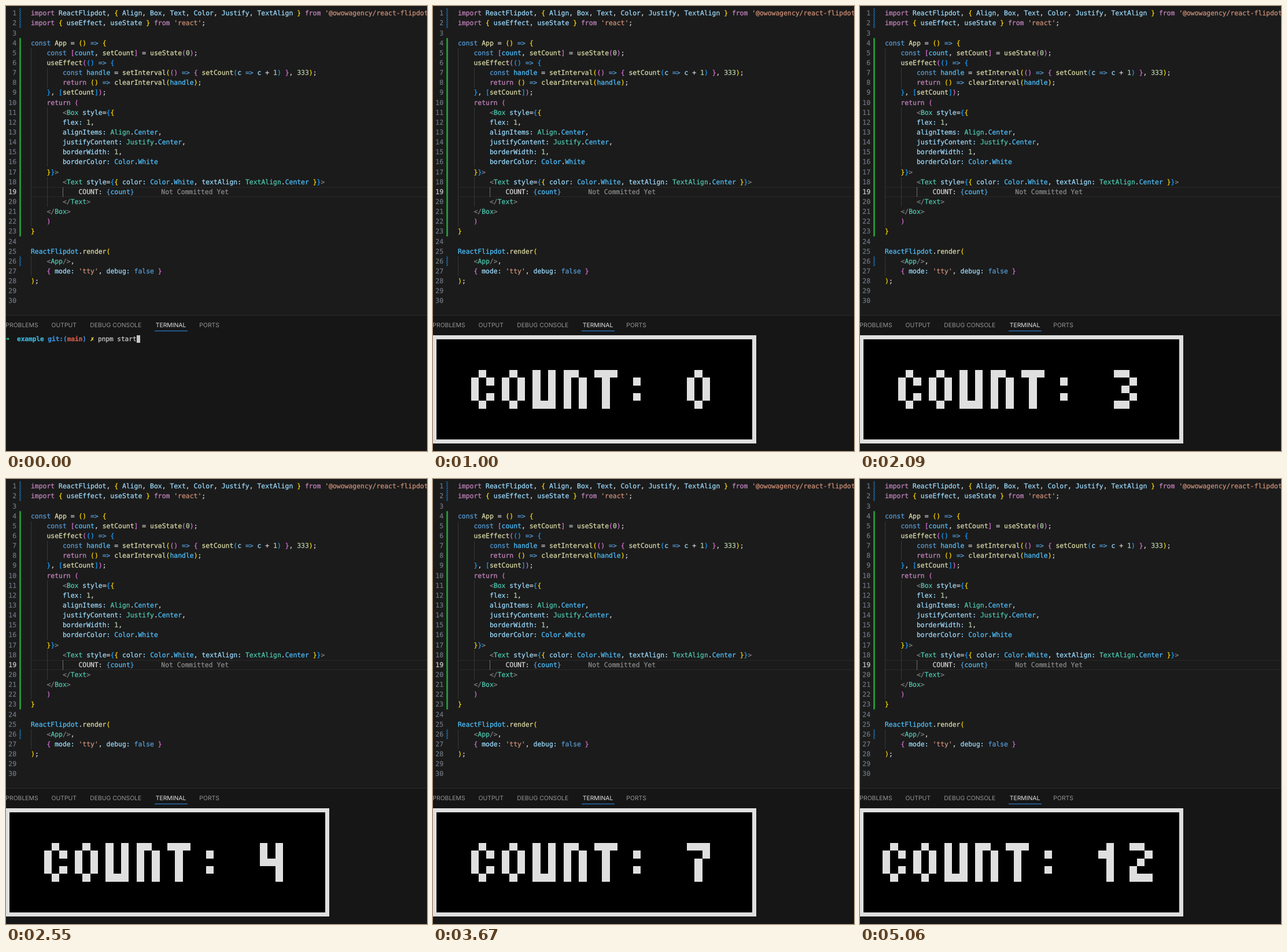
Animation of 728 by 769 pixels, one loop 5.09 s. Source, as an HTML page:

```html
<!DOCTYPE html>
<html lang="en">
<head>
<meta charset="utf-8">
<title>Flipdot counter</title>
<style>
  html, body { margin: 0; width: 100%; height: 100%; overflow: hidden; background: #1b1b1b; }
  svg { display: block; width: 728px; height: 769px; }
  text { white-space: pre; text-rendering: geometricPrecision; stroke-width: 0.25px; }
  .crisp { shape-rendering: crispEdges; }
  .code { font: 11.42px 'DejaVu Sans Mono', monospace; }
  .term { font: 11.074px 'DejaVu Sans Mono', monospace; }
  .tab { font: 10.4px Inter, 'Open Sans', sans-serif; }
  .bold { font-weight: bold; }
</style>
</head>
<body>
<svg viewBox="0 0 728 769" xmlns="http://www.w3.org/2000/svg">
  <defs>
    <pattern id="hatch" width="2.8" height="2.8" patternUnits="userSpaceOnUse" patternTransform="rotate(-45)">
      <rect width="2.8" height="1.4" fill="#1b74b8"/>
    </pattern>
  </defs>
  <rect width="728" height="769" fill="#1b1b1b"/>
  <g id="editor"></g>
  <rect y="534" width="728" height="235" fill="#161616"/>
  <rect y="534" width="728" height="1" fill="#2a2a2a"/>
  <g id="tabs"></g>
  <rect x="257" y="560.8" width="57" height="1.4" fill="#2a70bc"/>
  <g id="shell">
    <g id="prompt"></g>
    <g id="output"></g>
    <rect id="cursor" class="crisp" width="6.667" height="13.333" fill="#c8c8c8"/>
  </g>
  <g id="board" class="crisp">
    <rect x="-1" y="569" width="560" height="186.67" fill="#dfdfdf"/>
    <rect x="5.67" y="575.67" width="546.67" height="173.33" fill="#000"/>
    <path id="dots" fill="#dfdfdf"/>
  </g>
</svg>
<script>
const $ = id => document.getElementById(id);

function add(parent, name, attrs, content = '') {
  const el = document.createElementNS('http://www.w3.org/2000/svg', name);
  for (const key in attrs) el.setAttribute(key, attrs[key]);
  el.textContent = content;
  parent.appendChild(el);
  return el;
}

// A hairline stroke in the text colour gives the slightly heavy screen weight.
const ink = color => ({ fill: color, stroke: color });

// Editor: each "§x" switches the colour of the text that follows.
const COLORS = {
  k: '#c586c0', v: '#9cdcfe', w: '#d4d4d4', f: '#dcdcaa', b: '#569cd6', c: '#4fc1ff',
  t: '#4ec9b0', s: '#ce9178', n: '#b5cea8', g: '#ffd700', o: '#da70d6', u: '#179fff', a: '#808080'
};
const SOURCE = `§kimport §vReactFlipdot§w, §g{ §vAlign§w, §vBox§w, §vText§w, §vColor§w, §vJustify§w, §vTextAlign §g} §kfrom §s'@owowagency/react-flipdot'§w;
§kimport §g{ §vuseEffect§w, §vuseState §g} §kfrom §s'react'§w;

§bconst §fApp §w= §g() §b=> §g{
    §bconst §o[§ccount§w, §fsetCount§o] §w= §fuseState§o(§n0§o)§w;
    §fuseEffect§o(§u() §b=> §u{
        §bconst §chandle §w= §fsetInterval§g(§o() §b=> §o{ §fsetCount§u(§vc §b=> §vc §w+ §n1§u) §o}§w, §n333§g)§w;
        §kreturn §g() §b=> §fclearInterval§g(§chandle§g)§w;
    §u}§w, §u[§fsetCount§u]§o)§w;
    §kreturn §o(
        §a<§tBox §vstyle§w=§u{§g{
        §vflex: §n1§w,
        §valignItems: §tAlign§w.§cCenter§w,
        §vjustifyContent: §tJustify§w.§cCenter§w,
        §vborderWidth: §n1§w,
        §vborderColor: §cColor§w.§cWhite
    §g}§u}§a>
        §a<§tText §vstyle§w=§u{§g{ §vcolor: §cColor§w.§cWhite§w, §vtextAlign: §tTextAlign§w.§cCenter §g}§u}§a>
            §wCOUNT: §b{§ccount§b}
        §a</§tText§a>
    §a</§tBox§a>
    §o)
§g}

§cReactFlipdot§w.§frender§g(
    §a<§tApp§a/>§w,
    §o{ §vmode: §s'tty'§w, §vdebug: §bfalse §o}
§g)§w;

`.split('\n');

const editor = $('editor');
const LEFT = 43, ADVANCE = 6.875, LINE = 17.14, ACTIVE = 19;
const lineTop = n => 4 + (n - 1) * LINE;
const baseline = n => lineTop(n) + 12.3;

function guide(level, from, to, fill = '#373737') {
  add(editor, 'rect', {
    class: 'crisp', x: Math.round(LEFT + level * 4 * ADVANCE), y: lineTop(from),
    width: 1, height: (to - from + 1) * LINE, fill
  });
}
function gutter(from, to, fill) {
  add(editor, 'rect', { x: 23, y: lineTop(from), width: 3, height: (to - from + 1) * LINE, fill });
}

gutter(1, 2, 'url(#hatch)');
gutter(26, 26, 'url(#hatch)');
gutter(4, 23, '#259438');
for (const offset of [0, 16]) {
  add(editor, 'rect', {
    x: LEFT, y: Math.round(lineTop(ACTIVE)) + offset, width: 685, height: 1, fill: '#292929'
  });
}
guide(0, 5, 22);
guide(0, 26, 27);
guide(1, 7, 8);
guide(1, 11, 16);
guide(1, 18, 20);
guide(2, ACTIVE, ACTIVE, '#707070');

SOURCE.forEach((line, i) => {
  const n = i + 1, y = baseline(n);
  add(editor, 'text', {
    class: 'code', x: 18, y, 'text-anchor': 'end', ...ink(n === ACTIVE ? '#cccccc' : '#6e7681')
  }, n);
  const [indent, ...tokens] = line.split('§');
  const row = add(editor, 'text', { class: 'code', x: LEFT + indent.length * ADVANCE, y });
  for (const token of tokens) add(row, 'tspan', ink(COLORS[token[0]]), token.slice(1));
});
add(editor, 'text', { class: 'code', x: 268.3, y: baseline(ACTIVE), ...ink('#8c8c8c') }, 'Not Committed Yet');

// Panel tabs
[['PROBLEMS', -0.7], ['OUTPUT', 78.5], ['DEBUG CONSOLE', 145.2], ['TERMINAL', 258.7], ['PORTS', 334.3]]
  .forEach(([label, x]) => {
    const color = label === 'TERMINAL' ? '#e4e4e4' : '#969696';
    add($('tabs'), 'text', { class: 'tab', x, y: 554.8, fill: color }, label);
  });

// Terminal
const CELL = 20 / 3, ROW = 2 * CELL, TERM_X = -1, TERM_Y = 569;

function print(parent, col, row, content, color = '#d0d0d0', bold = false) {
  add(parent, 'text', {
    class: bold ? 'term bold' : 'term', x: TERM_X + col * CELL, y: TERM_Y + row * ROW + 10.4, ...ink(color)
  }, content);
}

const prompt = $('prompt');
print(prompt, 0, 0, '➜', '#23d18b', true);
print(prompt, 3, 0, 'example', '#3bb4dc', true);
print(prompt, 11, 0, 'git:(', '#3b8eda', true);
print(prompt, 16, 0, 'main', '#cb5a4a', true);
print(prompt, 20, 0, ')', '#3b8eda', true);
print(prompt, 22, 0, '✗', '#f0e442', true);
print(prompt, 24, 0, 'pnpm start');
print($('output'), 0, 2, '> @owowagency/example@1.0.0 start /Users/norvi/Git/react-flipdot/apps/example');
print($('output'), 0, 3, '> node dist/index.js');

// Flipdot glyphs, 3 x 5, drawn at double size
const GLYPHS = {
  C: '.X. X.X X.. X.X .X.', O: '.X. X.X X.X X.X .X.', U: 'X.X X.X X.X X.X XXX',
  N: 'XX. X.X X.X X.X X.X', T: 'XXX .X. .X. .X. .X.', ':': '... .X. ... .X. ...',
  0: '.X. X.X X.X X.X .X.', 1: '.X. XX. .X. .X. .X.', 2: 'XX. ..X .X. X.. XXX',
  3: 'XX. ..X .X. ..X XX.', 4: 'X.X X.X XXX ..X ..X', 5: 'XXX X.. XX. ..X XX.',
  6: '.XX X.. XX. X.X .X.', 7: 'XXX ..X .X. .X. .X.', 8: '.X. X.X .X. X.X .X.',
  9: '.X. X.X .XX ..X XX.'
};
const dotX = col => Math.round(TERM_X + col * CELL);
const dotY = row => Math.round(TERM_Y + row * CELL);

function dotPath(message) {
  const start = (84 - message.length * 8) / 2;
  let d = '';
  [...message].forEach((char, i) => {
    (GLYPHS[char] || '').split(' ').forEach((bits, r) => {
      [...bits].forEach((bit, c) => {
        if (bit !== 'X') return;
        const col = start + i * 8 + c * 2, row = 9 + r * 2;
        d += `M${dotX(col)} ${dotY(row)}H${dotX(col + 2)}V${dotY(row + 2)}H${dotX(col)}Z`;
      });
    });
  });
  return d;
}

const LOOP = 5090, ENTER = 300, OUTPUT = 690, RENDER = 1000, TICK = 335;
const show = (id, on) => $(id).setAttribute('display', on ? 'inline' : 'none');

function draw(t) {
  const running = t >= RENDER;
  show('shell', !running);
  show('board', running);
  if (running) {
    $('dots').setAttribute('d', dotPath('COUNT: ' + Math.floor((t - RENDER) / TICK)));
    return;
  }
  show('output', t >= OUTPUT);
  const [col, row] = t < ENTER ? [34, 0] : t < OUTPUT ? [0, 1] : [0, 5];
  $('cursor').setAttribute('x', TERM_X + col * CELL);
  $('cursor').setAttribute('y', TERM_Y + row * ROW);
}

function tick(now) {
  draw(now % LOOP);
  requestAnimationFrame(tick);
}
draw(0);
requestAnimationFrame(tick);
</script>
</body>
</html>
```
